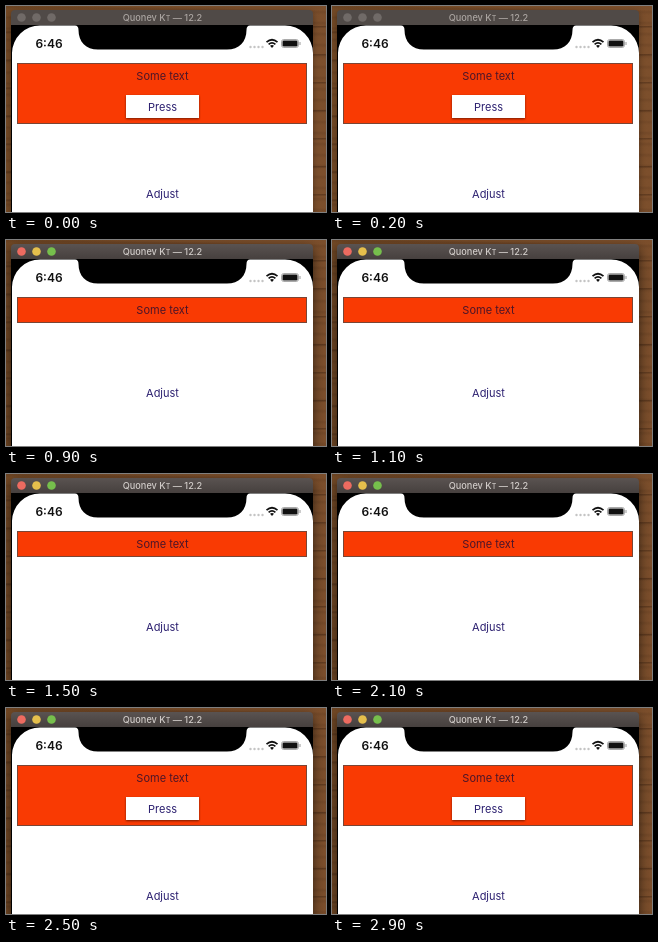
These frames come from a looping animation (320 px wide and 206 px high, 3000 ms). An HTML page:

```html
<!DOCTYPE html>
<html lang="en">
<head>
<meta charset="utf-8">
<style>
  html, body { margin: 0; width: 100%; height: 100%; overflow: hidden; }
  body {
    background:
      repeating-linear-gradient(179deg, #0000 0 25px, #3a200f66 26px, #0000 28px),
      repeating-linear-gradient(181deg, #0000 0 4px, #3a200f22 6px, #0000 9px 11px),
      linear-gradient(90deg, #734925, #7c4f2c);
  }
  svg { display: block; width: 100%; height: 100%; font: 11px Inter, sans-serif; }
  text { text-anchor: middle; fill: #2c2070; }
  .window { filter: drop-shadow(0 2px 3px #0005); }
  .bar { fill: #504a47; }
  .title { font-size: 9.2px; font-weight: 500; fill: #aaa4a0; }
  .lights { fill: #706a67; }
  .active .window { filter: drop-shadow(0 4px 6px #0009); }
  .active .bar { fill: url(#sheen); }
  .active .title { fill: #d0cbc8; }
  .active .red { fill: #ed6b60; }
  .active .yellow { fill: #e5bf4c; }
  .active .green { fill: #76bf4c; }
  .clock { font-size: 12px; font-weight: 600; fill: #111; }
  .label { fill: #4d1529; }
  .button { filter: drop-shadow(0 1px 1px #0008); }
</style>
</head>
<body>
<svg id="stage" viewBox="0 0 320 206">
  <linearGradient id="sheen" x2="0" y2="1">
    <stop stop-color="#5a5351"/>
    <stop offset="1" stop-color="#453f3d"/>
  </linearGradient>
  <g class="window">
    <path class="bar" d="M5 20V8q0-4 4-4H303q4 0 4 4V20Z"/>
    <path d="M5 19H307V210H5Z"/>
  </g>
  <g class="lights">
    <circle class="red" cx="15.5" cy="11.5" r="4.3"/>
    <circle class="yellow" cx="30.5" cy="11.5" r="4.3"/>
    <circle class="green" cx="45.5" cy="11.5" r="4.3"/>
  </g>
  <text class="title" x="156.5" y="15">Quonev K<tspan font-size="7">T</tspan> — 12.2</text>

  <path fill="#fff" d="M6 210V47A28 28 0 0 1 34 19.500H69Q72.500 19.500 72.500 24C72.500 36 80 43.500 92 43.500H221C233 43.500 240.500 36 240.500 24Q240.500 19.500 244 19.500H279A28 28 0 0 1 307 47V210Z"/>

  <text class="clock" x="43" y="42">6:46</text>
  <g fill="#c4c4c4">
    <circle cx="244.5" cy="41" r="1.2"/>
    <circle cx="248.5" cy="41" r="1.2"/>
    <circle cx="252.5" cy="41" r="1.2"/>
    <circle cx="256.5" cy="41" r="1.2"/>
  </g>
  <g fill="none" stroke="#111" stroke-width="1.7">
    <path d="M260.500 36.200Q266 31.300 271.500 36.200M262.600 38.400Q266 35.400 269.400 38.400"/>
    <path fill="#111" stroke="none" d="M264 39.800Q266 38 268 39.800L266 42Z"/>
    <rect x="275.500" y="33.500" width="17" height="8" rx="2.300" stroke="#aaa" stroke-width="1"/>
    <rect x="276.500" y="34.500" width="15" height="6" rx="1.300" fill="#111" stroke="none"/>
    <path d="M294 36v3" stroke="#aaa" stroke-width="1.2"/>
  </g>

  <rect id="panel" x="11.5" y="57.5" width="289" height="60" fill="#f93a03" stroke="#7a4535"/>
  <text class="label" x="156.5" y="74">Some text</text>
  <g id="press">
    <rect class="button" x="120" y="89" width="73" height="23" fill="#fff"/>
    <text x="156.5" y="104.5">Press</text>
  </g>
  <text id="adjust" x="156.5" y="192">Adjust</text>
</svg>
<script>
  const LOOP = 3000, COLLAPSE = 900, EXPAND = 2200;
  const get = id => document.getElementById(id);
  const [stage, panel, press, adjust] = ['stage', 'panel', 'press', 'adjust'].map(get);

  function draw(now) {
    const t = now % LOOP;
    const collapsed = t >= COLLAPSE && t < EXPAND;
    stage.classList.toggle('active', t >= COLLAPSE);
    panel.setAttribute('height', collapsed ? 25 : 60);
    press.style.display = collapsed ? 'none' : '';
    adjust.setAttribute('y', collapsed ? 157 : 192);
    requestAnimationFrame(draw);
  }
  draw(performance.now());
</script>
</body>
</html>
```
